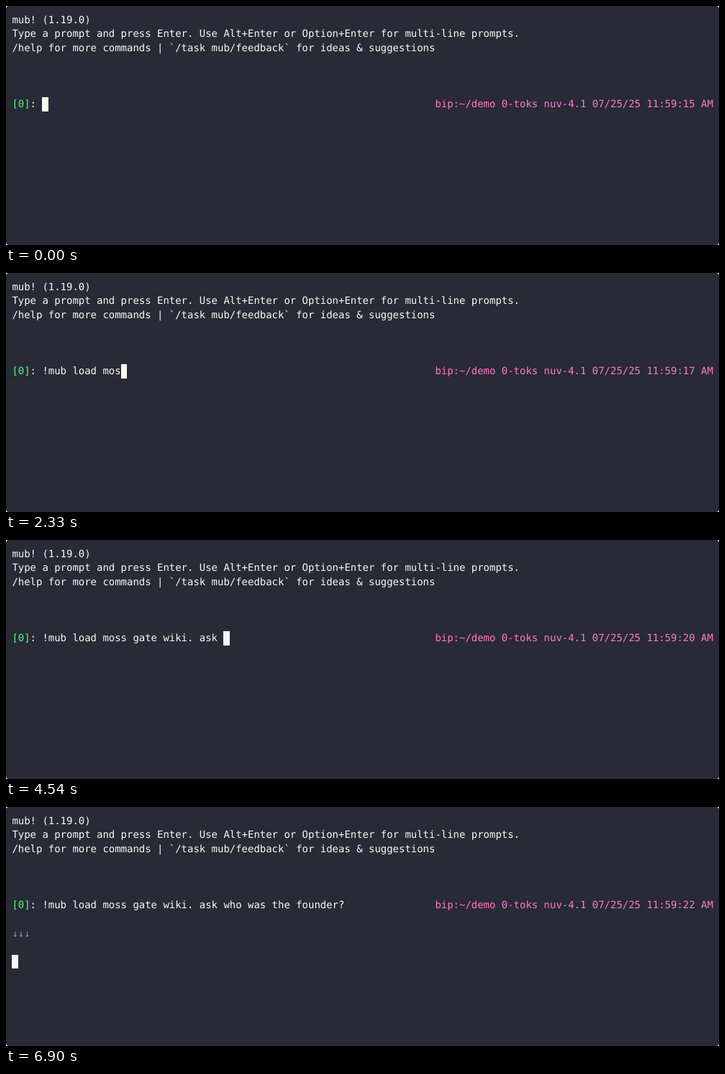
These frames come from a looping animation (991x333 px, 8000 ms). An HTML page:

```html
<!DOCTYPE html>
<html lang="en">
<head>
<meta charset="utf-8">
<title>Terminal session</title>
<style>
  html, body { margin: 0; height: 100%; overflow: hidden; background: #fff; }
  svg { display: block; }
  text {
    font: 14px "DejaVu Sans Mono", monospace;
    letter-spacing: calc(.6em - 1ch); /* cells are .6em wide */
    text-rendering: geometricPrecision;
    white-space: pre;
    fill: #f8f8f2;
    transform: rotate(.001deg); /* keeps baselines off the pixel grid */
  }
  .green { fill: #50fa7b; }
  .pink { fill: #ff79c6; }
  .dim { opacity: .5; }
  #cursor { fill: #f8f8f2; shape-rendering: crispEdges; }
</style>
</head>
<body>
<svg id="screen" width="991" height="333">
  <rect width="991" height="333" rx="4" fill="#282a36"/>
  <rect id="cursor" width="8.4" height="19.6"/>
</svg>
<script>
const LOOP = 8000, ENTER = 6900;
const FONT_SIZE = 14, CELL = FONT_SIZE * .6, LINE = FONT_SIZE * 1.4;
const COLUMNS = 116, PROMPT_ROW = 6, PROMPT_COL = 5;

// Typing comes in bursts, each with a steady time between keys (ms).
const BURSTS = [
  { text: '!', start: 1100, step: 0 },
  { text: 'mub load moss gate wi', start: 1370, step: 85 },
  { text: 'ki. ', start: 3230, step: 140 },
  { text: 'as', start: 3910, step: 90 },
  { text: 'k ', start: 4240, step: 300 },
  { text: 'who was the founder', start: 5220, step: 73 },
  { text: '?', start: 6700, step: 0 }
];
const keys = BURSTS.flatMap(({ text, start, step }) =>
  [...text].map((char, i) => ({ char, time: start + i * step })));

const screen = document.getElementById('screen');
const cursor = document.getElementById('cursor');

const cellX = col => (col + 1) * CELL;
const rowY = row => (row + .5) * LINE;

function print(col, row, content = '', className = '') {
  const text = document.createElementNS('http://www.w3.org/2000/svg', 'text');
  text.setAttribute('x', cellX(col));
  text.setAttribute('y', rowY(row) + FONT_SIZE);
  text.setAttribute('class', className);
  text.textContent = content;
  screen.append(text);
  return text;
}

function moveCursor(col, row) {
  cursor.setAttribute('x', cellX(col));
  cursor.setAttribute('y', rowY(row));
}

// The clock is only redrawn when a key is pressed.
function statusAt(keyTime) {
  const seconds = 15 + Math.floor((keyTime + 550) / 1000);
  return `bip:~/demo 0-toks nuv-4.1 07/25/25 11:59:${seconds} AM`;
}

print(0, 0, 'mub! (1.19.0)');
print(0, 1, 'Type a prompt and press Enter. Use Alt+Enter or Option+Enter for multi-line prompts.');
print(0, 2, '/help for more commands | `/task mub/feedback` for ideas & suggestions');
print(0, PROMPT_ROW, '[0]', 'green');
print(3, PROMPT_ROW, ':');
const input = print(PROMPT_COL, PROMPT_ROW);
const status = print(COLUMNS - statusAt(0).length, PROMPT_ROW, '', 'pink');
const arrows = print(0, 8, '', 'dim');

function draw() {
  const time = performance.now() % LOOP;
  const typed = keys.filter(key => key.time <= time);
  const entered = time >= ENTER;

  input.textContent = typed.map(key => key.char).join('');
  status.textContent = statusAt(typed.at(-1)?.time ?? 0);
  arrows.textContent = entered ? '↓↓↓' : '';
  if (entered) moveCursor(0, 10);
  else moveCursor(PROMPT_COL + typed.length, PROMPT_ROW);

  requestAnimationFrame(draw);
}
draw();
</script>
</body>
</html>
```
